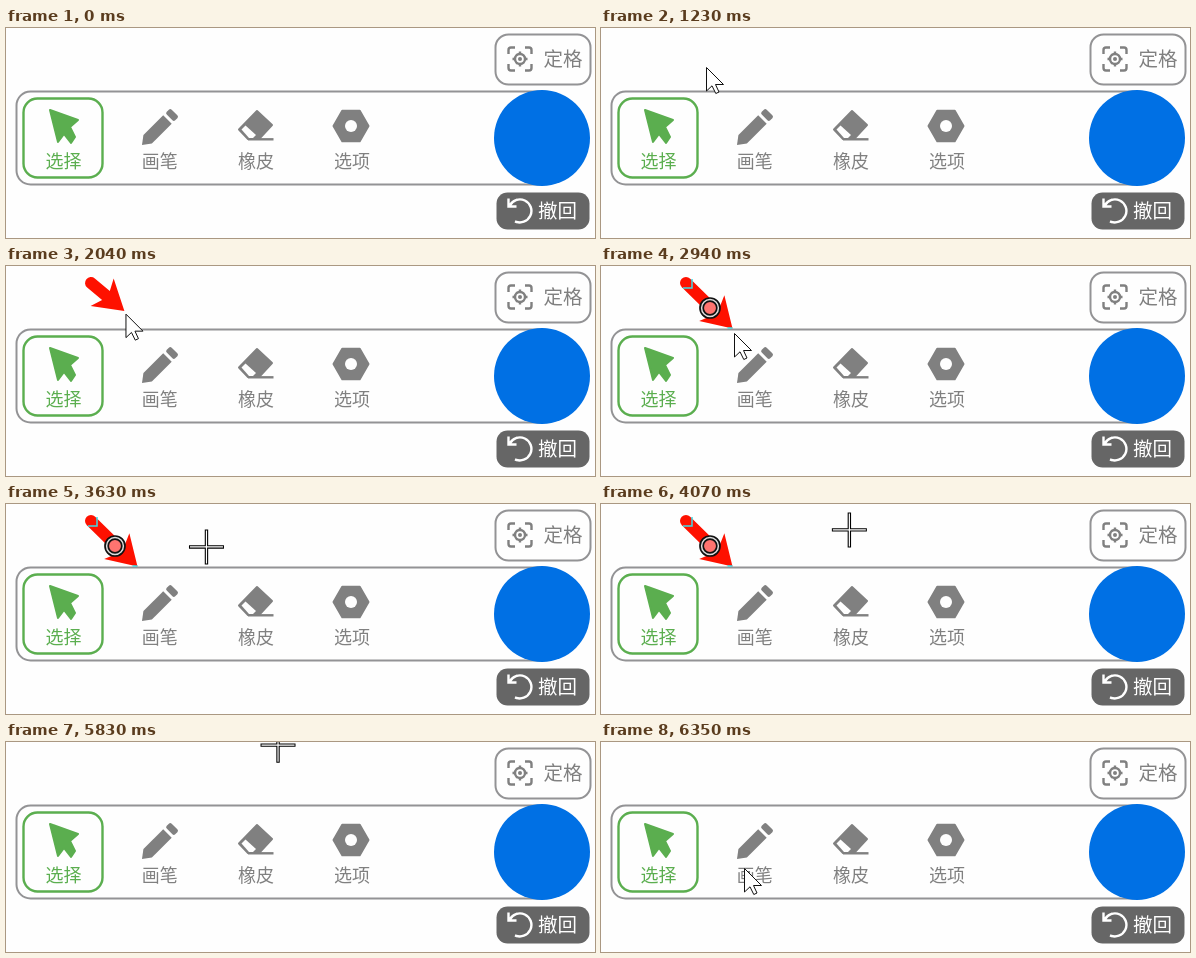
These frames come from a looping animation (589 px wide and 210 px high, 8000 ms). An HTML page:

```html
<!DOCTYPE html>
<html lang="zh-CN">
<head>
<meta charset="utf-8">
<style>
  html, body { margin: 0; width: 100%; height: 100%; overflow: hidden; background: #fefefe; }
  svg { display: block; }
  text { font: 18px "Noto Sans CJK SC", "Noto Sans CJK", sans-serif; text-anchor: middle; fill: #808080; }
  .big { font-size: 19.5px; }
  .frame { fill: #fefefe; stroke: #939395; stroke-width: 2; }
  .gray { fill: #808080; }
  .line { fill: none; stroke: #808080; stroke-width: 2.4; }
  .white { fill: #fff; }
  .ring { stroke: #111; stroke-width: 1.7; }
</style>
</head>
<body>
<svg width="589" height="210">
  <!-- toolbar -->
  <rect class="frame" x="10.5" y="63.5" width="540" height="93" rx="14"/>
  <rect x="17.5" y="70.5" width="79" height="79" rx="14" fill="none" stroke="#5bae4f" stroke-width="2.4"/>
  <path fill="#5bae4f" stroke="#5bae4f" stroke-width="2" stroke-linejoin="round"
        d="M44 82L72 92L64 99L69 109L65 115L58 106L52 114Z"/>
  <g class="gray" transform="translate(136 117) rotate(-45)">
    <path d="M0 0L8 -6H36V6H8Z"/>
    <rect x="39" y="-6" width="7" height="12" rx="2"/>
  </g>
  <g stroke-linejoin="round">
    <path class="gray" stroke="#808080" stroke-width="2" d="M251 83L266 97L253 111H242L233 101.5Z"/>
    <path fill="#fefefe" d="M235.5 101.5L239.5 97.5L250 107L247 110H243Z"/>
    <path class="line" d="M242 111.300H267.5"/>
  </g>
  <path id="hexagon" class="gray" stroke="#808080" stroke-width="2" stroke-linejoin="round"/>
  <circle cx="345" cy="98" r="6" fill="#fefefe"/>
  <g id="labels"></g>

  <!-- side buttons -->
  <rect class="frame" x="489.5" y="6.5" width="95" height="50" rx="13"/>
  <g id="focus" transform="translate(514 31)">
    <circle class="line" r="5"/>
    <circle class="gray" r="2"/>
  </g>
  <text class="big" x="557" y="37.5">定格</text>
  <circle cx="536" cy="110" r="48" fill="#0070e4"/>
  <rect x="490.5" y="164.5" width="93" height="37" rx="11" fill="#666"/>
  <path fill="none" stroke="#fff" stroke-width="2.4" d="M502.5 170.5V178.500H510.5M503.5 178A11.5 11.5 0 1 1 509 193.3"/>
  <text class="big white" x="551.5" y="189.5">撤回</text>

  <!-- drawn arrow and its handles -->
  <path id="arrow" fill="#fe1100"/>
  <g id="handles">
    <path fill="none" stroke="#3cdce6" stroke-width="1.5" d="M91 13V22H82M126.5 62H131.5"/>
    <circle class="ring" cx="109" cy="42" r="10" fill="#ddd"/>
    <circle class="ring" cx="109" cy="42" r="6.8" fill="#ff7470"/>
  </g>

  <!-- pointers -->
  <path id="pointer" class="white" stroke="#111" d="M.5 .5V24L6 18.8L9.8 26.5L13 25L9.5 17.5H17.5Z"/>
  <g id="cross">
    <path stroke="#000" stroke-width="3.4" d="M-17.5 0H17.5M0 -17.5V17.5"/>
    <path stroke="#fff" stroke-width="1.2" d="M-16.5 0H16.5M0 -16.5V16.5"/>
  </g>
</svg>
<script>
const LOOP = 8000;
const byId = id => document.getElementById(id);
const [arrow, handles, pointer, cross] = ['arrow', 'handles', 'pointer', 'cross'].map(byId);

['选择', '画笔', '橡皮', '选项'].forEach((label, i) => {
  const color = i ? '#808080' : '#5bae4f';
  byId('labels').innerHTML += `<text x="${57.5 + 96.2 * i}" y="140" style="fill:${color}">${label}</text>`;
});

const corners = Array.from({ length: 6 }, (_, i) => {
  const angle = i * Math.PI / 3;
  return `${345 + 17.5 * Math.cos(angle)} ${98 + 17.5 * Math.sin(angle)}`;
});
byId('hexagon').setAttribute('d', `M${corners.join('L')}Z`);

for (let turn = 0; turn < 360; turn += 90) {
  byId('focus').innerHTML += `<path class="line" transform="rotate(${turn})"
    d="M-11.5 -5V-9Q-11.5 -11.500 -9 -11.5H-5M0 -7.5V-5"/>`;
}

// Easing
const linear = p => p;
const easeOut = power => p => 1 - (1 - p) ** power;
const easeInOut = p => p < 0.5 ? 8 * p ** 4 : 1 - 8 * (1 - p) ** 4;
const progress = (t, start, end) => Math.min(1, Math.max(0, (t - start) / (end - start)));
const mix = (a, b, p) => a + (b - a) * p;

const entry = [34, 0], tail = [85, 17], tip = [131.5, 62.5], exit = [364.5, 0];
const drag = { start: 1830, end: 2280, to: [133, 67], easeX: easeOut(2), easeY: easeOut(1.5) };
const moves = [
  { start: 990, end: 1230, to: [105, 39] },
  { start: 1520, end: 1690, to: [63, 18] },
  { start: 1690, end: 1830, to: tail },
  drag,
  { start: 3350, end: 4150, to: [249.5, 25.5], easeX: easeOut(2), easeY: easeOut(2) },
  { start: 4190, end: 4310, to: [260.5, 25.5] },
  { start: 4640, end: 4780, to: exit },
  { start: 5670, end: 6350, to: [143, 126], easeX: easeOut(2), easeY: easeInOut }
];

function follow([x, y], { start, end, to, easeX = linear, easeY = linear }, t) {
  const p = progress(t, start, end);
  return [mix(x, to[0], easeX(p)), mix(y, to[1], easeY(p))];
}

function arrowShape([x, y]) {
  const dx = x - tail[0], dy = y - tail[1], length = Math.hypot(dx, dy) || 1;
  const ux = dx / length, uy = dy / length, size = Math.min(1, length / 32);
  // Point measured back from the tip and sideways from the shaft.
  const pt = (back, side) => `${x - ux * back - uy * side} ${y - uy * back + ux * side}`;
  const wing = 29 * size, notch = 24 * size, half = 18 * size;
  return `M${pt(0, 0)}L${pt(wing, -half)}L${pt(notch, -6)}L${pt(length, -6)}` +
    `A6 6 0 0 0 ${pt(length, 6)}L${pt(notch, 6)}L${pt(wing, half)}Z`;
}

function show(el, visible) {
  el.style.display = visible ? '' : 'none';
}

function draw(now) {
  const t = now % LOOP;
  const [x, y] = moves.reduce((from, move) => follow(from, move, t), entry);
  const visible = t >= 990 && (t < 4800 || t >= 5670);
  const crossed = (t > 1520 && t < 1850) || (t > 3350 && y < 62);
  show(pointer, visible && !crossed);
  show(cross, visible && crossed);
  for (const el of [pointer, cross]) el.setAttribute('transform', `translate(${x} ${y})`);
  show(arrow, t >= 1850 && t < 5300);
  show(handles, t >= 2940 && t < 5300);
  arrow.setAttribute('d', arrowShape(follow(tail, { ...drag, to: tip }, t)));
  requestAnimationFrame(draw);
}
requestAnimationFrame(draw);
</script>
</body>
</html>
```
